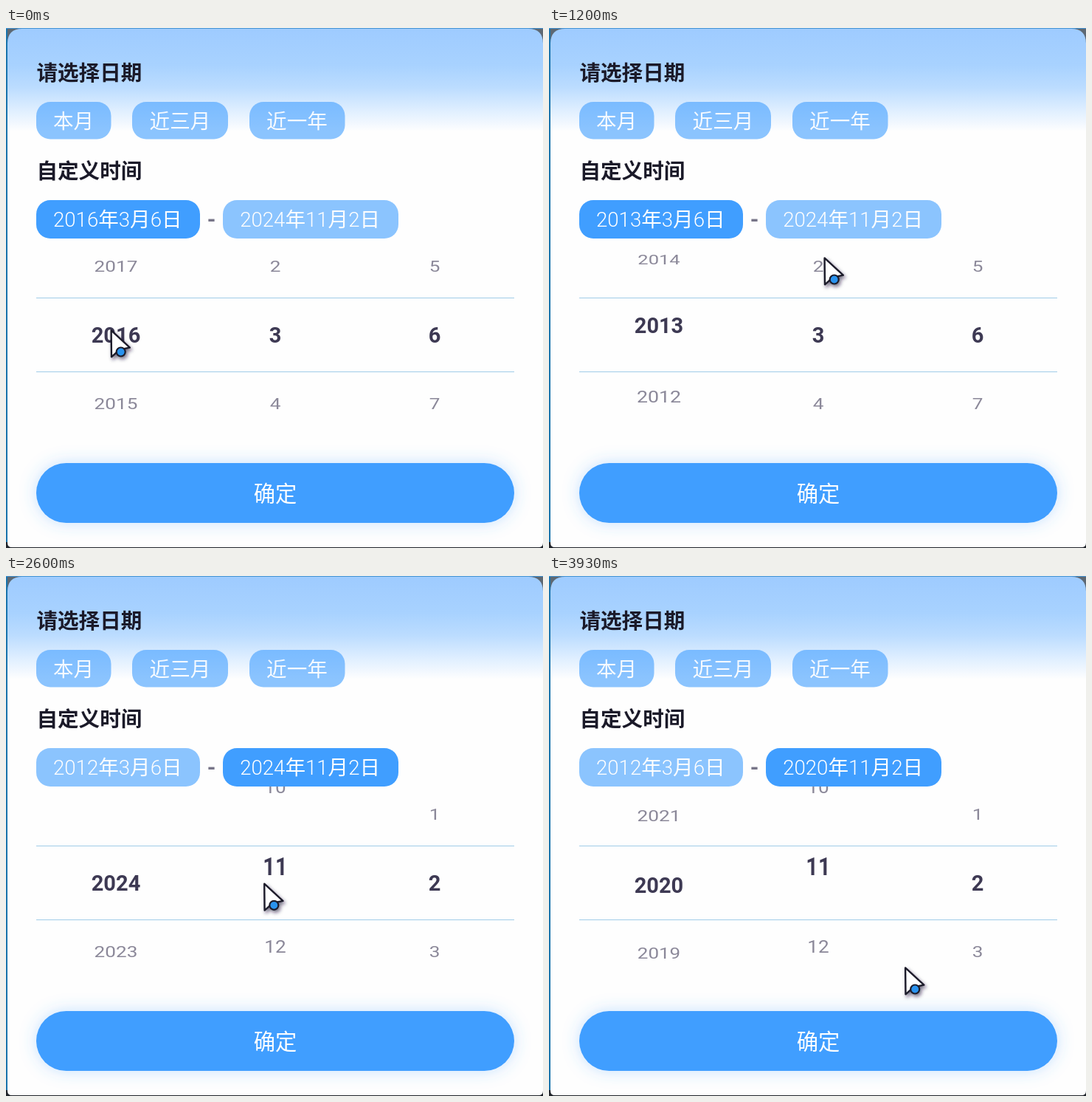
Animation of 728x704 px, one loop 4.06 s. Source, as an HTML page:

```html
<!DOCTYPE html>
<html lang="zh-CN">
<head>
<meta charset="utf-8">
<title>日期选择</title>
<style>
html, body { margin: 0; width: 100%; height: 100%; overflow: hidden; background: #fefefe; }
svg { display: block; width: 728px; height: 704px; font-family: Roboto, "Noto Sans CJK SC", sans-serif; }
.title { font-size: 28.6px; font-weight: 700; fill: #1b1a29; }
.pill rect { fill: #409eff; }
.pill text { fill: #fff; font-size: 27.6px; }
.pill .date { font-weight: 300; }
.faded { opacity: .6; }
#wheel text { font-size: 29px; fill: #8b8899; text-anchor: middle; }
#wheel .on { font-weight: 700; fill: #3d3953; }
.mid { text-anchor: middle; }
</style>
</head>
<body>
<svg viewBox="0 0 728 704">
  <defs>
    <linearGradient id="sky" x2="0" y2="140" gradientUnits="userSpaceOnUse">
      <stop offset="0" stop-color="#9ecbff"/>
      <stop offset=".36" stop-color="#a8d2ff"/>
      <stop offset=".57" stop-color="#bbdcff"/>
      <stop offset=".79" stop-color="#deeeff"/>
      <stop offset="1" stop-color="#fefefe"/>
    </linearGradient>
    <filter id="glow" x="-10%" y="-50%" width="120%" height="200%">
      <feDropShadow dx="0" dy="0" stdDeviation="11" flood-color="#409eff" flood-opacity=".3"/>
    </filter>
    <filter id="shade" x="-50%" y="-50%" width="220%" height="220%">
      <feDropShadow dx="2" dy="3" stdDeviation="2.5" flood-color="#1b1838" flood-opacity=".6"/>
    </filter>
    <clipPath id="window"><rect x="41" y="285" width="648" height="262"/></clipPath>
  </defs>

  <rect width="728" height="704" fill="#5d6873"/>
  <rect width="2" height="704" fill="#1b75ad"/>
  <rect width="728" height="1" fill="#4795d2"/>
  <rect y="696" width="728" height="8" fill="#20242a"/>
  <path d="M2 21Q2 1 22 1H708Q728 1 728 21V697Q728 703 722 703H8Q2 703 2 697Z" fill="url(#sky)"/>

  <text class="title" x="41.4" y="71">请选择日期</text>
  <text class="title" x="41.4" y="203.8">自定义时间</text>

  <path d="M41 365.5H689M41 465.5H689" stroke="#a0cce8"/>
  <g id="wheel" clip-path="url(#window)"></g>

  <g class="pill faded">
    <rect x="41" y="100" width="101.5" height="50.5" rx="19"/>
    <text class="mid" x="91.5" y="136.3">本月</text>
    <rect x="171" y="100" width="130" height="50.5" rx="19"/>
    <text class="mid" x="236" y="136.3">近三月</text>
    <rect x="330" y="100" width="129.5" height="50.5" rx="19"/>
    <text class="mid" x="394.5" y="136.3">近一年</text>
  </g>
  <g class="pill" id="from">
    <rect x="41" y="233" width="222" height="52" rx="19"/>
    <text class="date" x="64" y="269.2"></text>
  </g>
  <text class="mid" x="278.5" y="269" font-size="30" font-weight="700" fill="#777588">-</text>
  <g class="pill" id="to">
    <rect x="294" y="233" width="238" height="52" rx="19"/>
    <text class="date" x="317.2" y="269.2"></text>
  </g>

  <rect x="41" y="589" width="648" height="81" rx="40.5" fill="#409eff" filter="url(#glow)"/>
  <text class="mid" x="365" y="641" font-size="29.3" fill="#fff">确定</text>

  <g id="cursor" filter="url(#shade)" stroke="#1d1c2b" stroke-linejoin="round">
    <path d="M.6 .4L25.8 23.6L12 26.5L1 36.3Z" fill="#fff" stroke-width="2.4"/>
    <circle cx="13.7" cy="29.5" r="6" fill="#2a93ee" stroke-width="2.2"/>
  </g>
</svg>
<script>
const LOOP = 4060, TICK = 1000 / 15;
const SWITCH = 26, STRETCH = 39; // in ticks
const CENTER = 415.5, RADIUS = 130, STEP = 45.7 * Math.PI / 180;

// Resting points of the pointer: tick, x, y
const stops = [[0, 142, 409], [7, 170, 230], [18, 373, 311], [26, 442, 264], [30, 428, 410],
  [34, 421, 319], [38, 370, 420], [44, 95, 370], [48, 135, 250], [59, 482.5, 530]];

const $ = id => document.getElementById(id);
const mix = (a, b, u) => a + (b - a) * u;
const ramp = (t, t0, t1) => Math.min(1, Math.max(0, (t - t0) / (t1 - t0)));
const ease = (t, t0, t1) => {
  const u = ramp(t, t0, t1);
  return u * u * (3 - 2 * u);
};

function pointerAt(t) {
  const i = Math.max(1, stops.findIndex(s => s[0] >= t));
  const [t0, x0, y0] = stops[i - 1], [t1, x1, y1] = stops[i];
  const u = ease(t, t0, t1);
  return [mix(x0, x1, u), mix(y0, y1, u)];
}

// A fast drag, a slower glide, then a snap to the final year.
const fromYear = t => 2016 - 1.45 * ramp(t, 0, 7) - 1.675 * ramp(t, 7, 18) - 0.875 * ramp(t, 18, 23);
const toYear = t => mix(2024, 2020.03, ease(t, 41.35, 59));
const toMonth = t => 11 + ease(t, 31, 34) - ease(t, 35, STRETCH);

function makeColumn(x, dir, min, max) {
  const items = Array.from({ length: 5 }, () => {
    const el = document.createElementNS("http://www.w3.org/2000/svg", "text");
    el.setAttribute("y", 10.3);
    return $("wheel").appendChild(el);
  });
  return (value, shift = 0, tall = 1) => {
    const near = Math.round(value);
    items.forEach((el, i) => {
      const n = near + i - 2;
      const angle = (n - value) * dir * STEP;
      const cos = Math.cos(angle);
      const shown = n >= min && n <= max && Math.abs(angle) < 1.45;
      el.style.display = shown ? "" : "none";
      if (!shown) return;
      const y = CENTER + shift + RADIUS * tall * Math.sin(angle);
      const sx = 1 / (1 + 0.36 * (1 - cos));
      el.textContent = n;
      el.setAttribute("class", n === near ? "on" : "");
      el.setAttribute("transform", `translate(${x} ${y}) scale(${sx} ${cos * tall})`);
    });
  };
}

const drawYear = makeColumn(149, -1, 1990, 2024);
const drawMonth = makeColumn(365, 1, 1, 12);
const drawDay = makeColumn(581, 1, 1, 30);

function setPill(id, active, y, m, d) {
  $(id).classList.toggle("faded", !active);
  $(id).lastElementChild.textContent = `${Math.round(y)}年${Math.round(m)}月${d}日`;
}

function render(time) {
  // The screen refreshes once per tick; the margin absorbs rounded times.
  const t = Math.min(59, Math.floor((time + 10) / TICK));
  const second = t >= SWITCH;
  const y1 = fromYear(t), y2 = toYear(t), m2 = toMonth(t);
  setPill("from", !second, y1, 3, 6);
  setPill("to", second, y2, m2, 2);
  drawYear(second ? y2 : y1);
  // The month column ends up taller and lifted after its second drag.
  if (t >= STRETCH) drawMonth(m2, -22, 1.16);
  else drawMonth(second ? m2 : 3);
  drawDay(second ? 2 : 6);
  $("cursor").setAttribute("transform", `translate(${pointerAt(t)})`);
}

const start = performance.now();
function loop() {
  render((performance.now() - start) % LOOP);
  requestAnimationFrame(loop);
}
loop();
</script>
</body>
</html>
```
